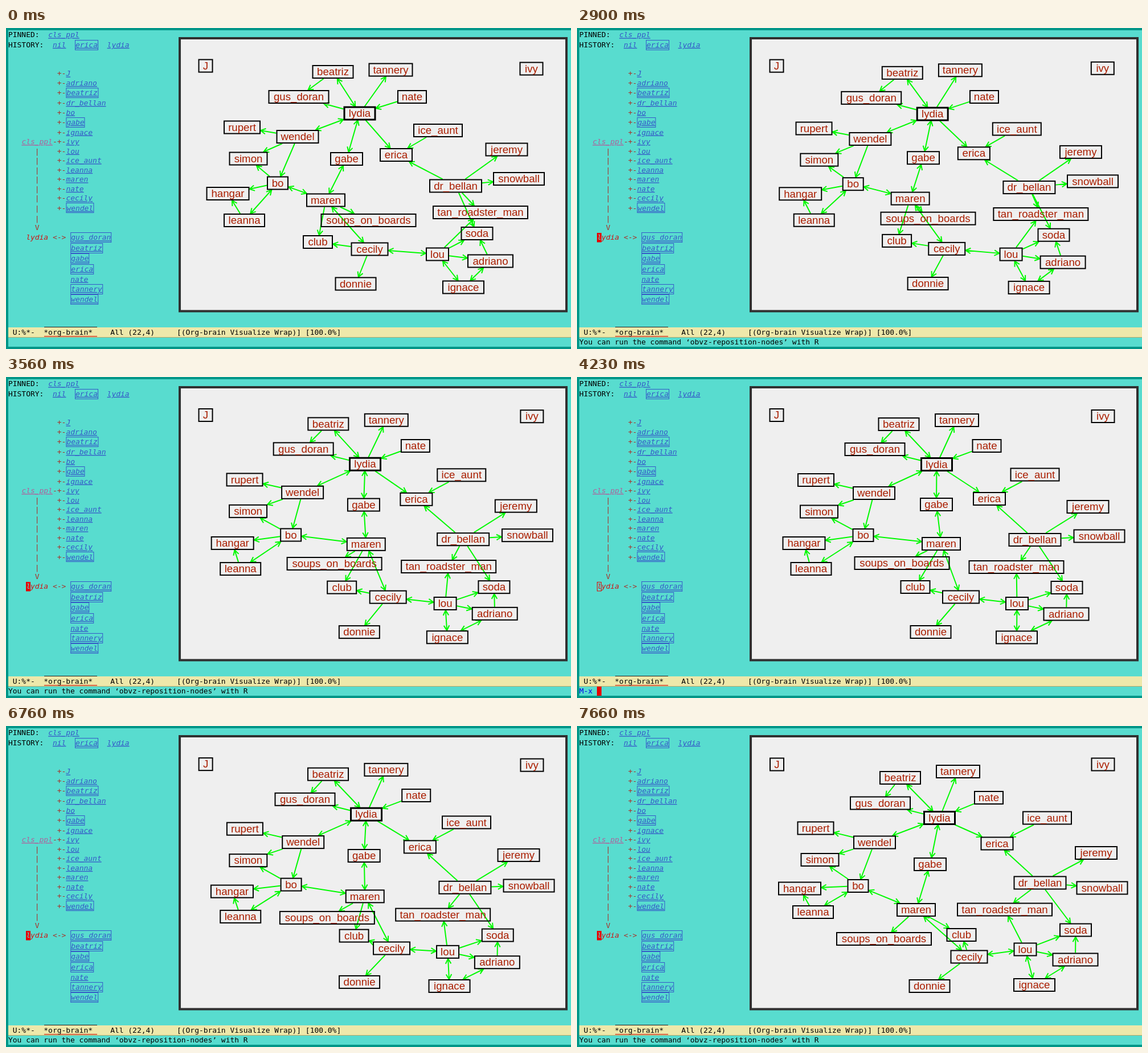
An HTML page for the animation above (8 s loop, 992 px wide and 564 px high).

```html
<!DOCTYPE html>
<html lang="en">
<head>
<meta charset="utf-8">
<title>Graph layout in an editor</title>
<style>
html, body { margin: 0; width: 100%; height: 100%; overflow: hidden; background: #58dccf; }
svg { display: block; width: 100%; height: 100%; }
text { white-space: pre; }
.mono { font: 12.95px "DejaVu Sans Mono", monospace; fill: #000; }
.link, .root { font-style: italic; fill: #3558c8; text-decoration: underline; }
.root { fill: #b0609c; }
.tree { fill: #a8322a; }
.self { font-style: italic; fill: #d01414; }
.prompt { fill: #0000e6; }
.cut { fill: #58dccf; }
.box { fill: none; stroke: #3558c8; stroke-width: 1; }
.label { font: 18.67px "Liberation Sans", Arial, sans-serif; fill: #aa1e00; text-anchor: middle; }
.node { fill: none; stroke: #000; stroke-width: 2; }
.edges { fill: none; stroke: #00fa00; stroke-width: 2; }
</style>
</head>
<body>
<svg id="stage" viewBox="0 0 992 564"></svg>
<script>
const stage = document.getElementById("stage");
const LOOP = 8000, COL = 7.8, LEFT = 4;
const col = n => LEFT + n * COL;

function add(tag, attrs, parent = stage, content) {
  const el = document.createElementNS("http://www.w3.org/2000/svg", tag);
  for (const k in attrs) el.setAttribute(k, attrs[k]);
  if (content !== undefined) el.textContent = content;
  parent.appendChild(el);
  return el;
}
const rect = (x, y, width, height, attrs, parent) =>
  add("rect", { x, y, width, height, ...attrs }, parent);
const mono = (str, x, mid, cls = "", parent) =>
  add("text", { x, y: mid + 4.4, class: "mono " + cls }, parent, str);

function link(str, x, mid, boxed) {
  if (boxed) rect(x + 0.5, Math.round(mid - 9) + 0.5, Math.round(str.length * COL) + 1, 17, { class: "box" });
  mono(str, x + (boxed ? 1 : 0), mid, "link");
}

// Window
rect(0, 0, 992, 564, { fill: "#58dccf" });
rect(0, 0, 992, 4, { fill: "#009688" });
rect(0, 0, 4, 564, { fill: "#009688" });
rect(0, 560, 992, 4, { fill: "#009688" });
rect(305, 18, 679, 479.5, { fill: "#efefef", stroke: "#303030", "stroke-width": 4 });

// Sidebar
mono("PINNED:", LEFT, 12);
link("cls_ppl", col(9), 12);
mono("HISTORY:", LEFT, 29.5);
link("nil", col(10), 29.5);
link("erica", col(15), 29.5, true);
link("lydia", col(22) + 2, 29.5);

const ROW = 16.55;
let rowY = 80;
function nextRow(boxed) {
  const mid = rowY + (boxed ? 0.8 : 0);
  rowY += boxed ? 18.5 : ROW;
  return mid;
}
const linked = ["gus_doran", "beatriz", "gabe", "erica", "tannery", "wendel"];
const members = ["J", "adriano", "beatriz", "dr_bellan", "bo", "gabe", "ignace", "ivy",
  "lou", "ice_aunt", "leanna", "maren", "nate", "cecily", "wendel"];
members.forEach((name, i) => {
  const boxed = linked.includes(name), mid = nextRow(boxed);
  mono("+-", col(11), mid, "tree");
  link(name, col(13), mid, boxed);
  if (i === 7) {
    mono("cls_ppl", col(3), mid, "root");
    mono("-", col(10), mid, "tree");
  }
  if (i > 7) mono("|", col(6), mid, "tree");
});
mono("|", col(6), nextRow(), "tree");
mono("V", col(6), nextRow(), "tree");
mono("lydia", col(4), 368, "self");
mono("<->", col(10), 368, "tree");
["gus_doran", "beatriz", "gabe", "erica", "nate", "tannery", "wendel"].forEach(name => {
  const boxed = linked.includes(name);
  link(name, col(14), nextRow(boxed), boxed);
});

// Mode line
rect(4, 526, 988, 18, { fill: "#eee8aa" });
rect(4, 543, 988, 1, { fill: "#b5a76a" });
rect(67, 525, 93, 1, { fill: "#222" });
rect(67, 541, 93, 1.3, { fill: "#d03020" });
mono(" U:%*-  *org-brain*    All (22,4)     [(Org-brain Visualize Wrap)] [100.0%]", LEFT, 535);

// Cursors and echo area
const layer = () => add("g", {});
const solid = layer(), hollow = layer(), prompt = layer(), typed = layer(), caret = layer(), note = layer();
rect(35, 360, 8, 16.5, { fill: "#e80000" }, solid);
mono("l", col(4), 368, "self cut", solid);
rect(35.5, 360.5, 7, 15.5, { fill: "none", stroke: "#e80000" }, hollow);
mono("M-x", LEFT, 552, "prompt", prompt);
mono("obvz-reposition-nodes", col(4), 552, "", typed);
rect(35, 544, 8, 16, { fill: "#e80000" }, caret);
const caretChar = mono("o", col(4), 552, "cut", caret);
mono("You can run the command \u2018obvz-reposition-nodes\u2019 with R", LEFT, 552, "", note);

// Graph: start as x, y, box width; later poses as x, y
const names = ["J", "beatriz", "tannery", "ivy", "gus_doran", "nate", "lydia", "rupert", "wendel",
  "ice_aunt", "erica", "simon", "gabe", "jeremy", "dr_bellan", "snowball", "bo", "hangar", "maren",
  "leanna", "soups_on_boards", "tan_roadster_man", "soda", "club", "cecily", "lou", "adriano",
  "donnie", "ignace"];
const start = [
  [350.5, 66.5, 26], [574, 77, 73], [675.5, 73.5, 78], [922.5, 71.5, 42], [514, 121, 107],
  [713, 121, 52], [621, 150, 57], [414.5, 174.5, 65], [512, 191, 75], [758.5, 180, 87],
  [685, 223, 58], [425.5, 229.5, 68], [598, 230, 58], [879, 213.5, 75], [789.5, 277.5, 93],
  [900.5, 265, 91], [477, 272.5, 38], [389.5, 291, 76], [561.5, 302.5, 69], [418.5, 338, 73],
  [636.5, 338, 168], [833, 324, 168], [827, 361, 57], [547.5, 376, 53], [638.5, 388.5, 66],
  [757.5, 397.5, 41], [850.5, 409.5, 81], [614, 449.5, 73], [803, 455.5, 74]];
const middle = [
  [350.5, 67], [565, 83], [667, 76], [923.5, 69], [523, 127], [719.5, 121], [631.5, 153.5],
  [419.5, 181], [521.5, 204], [804, 171.5], [724, 214], [425, 236.5], [631, 224], [897, 228],
  [804, 286], [917, 279.5], [502.5, 278], [398.5, 292], [639.5, 293], [411, 337], [570.5, 327],
  [771.5, 334], [860, 370], [594, 369], [674, 386.5], [772.5, 398], [859, 416.5], [621, 448],
  [772, 457.5]];
const last = [
  [351, 67.5], [567.5, 91], [669, 80], [923.5, 67.5], [532.5, 135.5], [723, 126], [636.5, 161.5],
  [419, 179.5], [522.5, 204.5], [825.5, 161.5], [737.5, 206.5], [426.5, 235], [620, 243],
  [911.5, 223], [813, 275.5], [922, 284.5], [493.5, 281], [391, 285.5], [595.5, 323],
  [414.5, 327], [539, 374], [751, 322.5], [875.5, 358.5], [675, 367], [688.5, 405.5],
  [787, 392.5], [875, 410.5], [619, 457], [803, 455]];

// "=" marks an arrow at both ends
const links = `beatriz>gus_doran beatriz=lydia lydia>gus_doran lydia>tannery nate>lydia lydia=wendel
  lydia=gabe lydia>erica wendel>rupert wendel>simon wendel>bo bo>simon bo>hangar bo=leanna
  leanna>hangar bo=maren gabe=maren maren>soups_on_boards maren>club maren=cecily cecily>club
  cecily>donnie cecily=lou ice_aunt>erica dr_bellan>erica dr_bellan>jeremy dr_bellan>snowball
  dr_bellan>tan_roadster_man dr_bellan>soda lou>tan_roadster_man lou>soda lou>adriano lou=ignace
  adriano>soda adriano=ignace`.split(/\s+/).map(s => {
    const [a, b] = s.split(/[>=]/).map(n => names.indexOf(n));
    return { a, b, both: s.includes("=") };
  });

const edges = add("path", { class: "edges" });
const nodes = names.map((name, i) => {
  const g = add("g", {}), w = start[i][2], main = name === "lydia";
  const line = main ? 3 : 2;
  rect((line - w) / 2, -11, w - line, 22, { class: "node", style: `stroke-width:${line}px` }, g);
  add("text", { y: 6.2, class: "label" }, g, name);
  return { g, w, x: 0, y: 0 };
});

// Where the line from n toward m leaves the box of n
function rim(n, m) {
  const dx = m.x - n.x, dy = m.y - n.y;
  const k = Math.min(n.w / 2 / Math.abs(dx || 1e-6), 12 / Math.abs(dy || 1e-6));
  return [n.x + dx * k, n.y + dy * k];
}
function head([x, y], angle) {
  const arm = s => {
    const a = angle + Math.PI + s * 0.5;
    return `${(x + 10 * Math.cos(a)).toFixed(2)} ${(y + 10 * Math.sin(a)).toFixed(2)}`;
  };
  return `M${arm(1)}L${x.toFixed(2)} ${y.toFixed(2)}L${arm(-1)}`;
}

const SPAN = 1180, TICK = 50.66;
function progress(ms, delay) {
  const held = 420 + Math.floor((ms - 420) / TICK + 0.01) * TICK;
  return Math.min(1, Math.max(0, (held - delay + 0.5) / (SPAN - delay)));
}

function drawGraph(t) {
  const late = t >= 6480;
  const from = late ? middle : start, to = late ? last : middle;
  const p = late ? progress(t - 6480, 25) : progress(t - 2480, 90);
  nodes.forEach((n, i) => {
    n.x = from[i][0] + (to[i][0] - from[i][0]) * p;
    n.y = from[i][1] + (to[i][1] - from[i][1]) * p;
    n.g.setAttribute("transform", `translate(${n.x.toFixed(2)} ${n.y.toFixed(2)})`);
  });
  edges.setAttribute("d", links.map(({ a, b, both }) => {
    const A = nodes[a], B = nodes[b], tail = rim(A, B), tip = rim(B, A);
    const angle = Math.atan2(B.y - A.y, B.x - A.x);
    return `M${tail}L${tip}` + head(tip, angle) + (both ? head(tail, angle + Math.PI) : "");
  }).join(""));
}

const show = (el, on) => el.setAttribute("visibility", on ? "visible" : "hidden");
const within = (t, a, b) => t >= a && t < b;

function drawEditor(t) {
  const asking = within(t, 370, 2480) || within(t, 4230, 6480);
  const filled = within(t, 1170, 2480) || within(t, 5120, 6480);
  const blinkOff = within(t, 840, 1170) || within(t, 1690, 2160) ||
    within(t, 4720, 5120) || within(t, 5630, 6120);
  show(solid, t >= 370 && !asking);
  show(hollow, asking);
  show(prompt, asking);
  show(typed, filled);
  show(caret, asking && !blinkOff);
  show(caretChar, filled && !blinkOff);
  show(note, within(t, 2480, 4170) || t >= 6480);
}

function draw(t) {
  drawGraph(t);
  drawEditor(t);
}

const begin = performance.now();
function frame() {
  draw((performance.now() - begin) % LOOP);
  requestAnimationFrame(frame);
}
draw(0);
requestAnimationFrame(frame);
</script>
</body>
</html>
```
